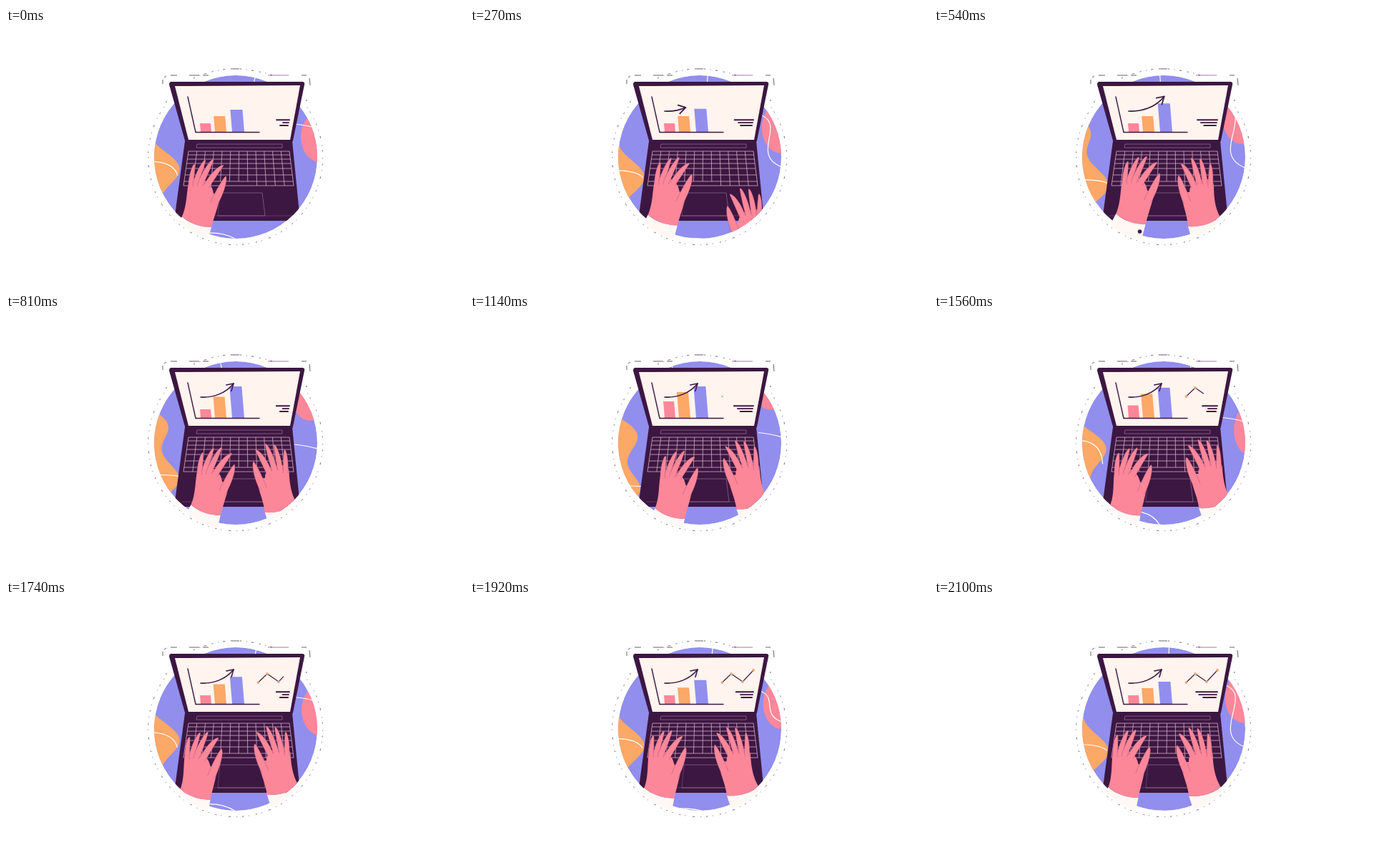
These frames come from a looping animation (640 px wide and 360 px high, 2.13 s). An HTML page:

```html
<!DOCTYPE html>
<html lang="en">
<head>
<meta charset="utf-8">
<title>Typing on a laptop</title>
<style>
html, body { margin: 0; width: 100%; height: 100%; overflow: hidden; background: #fff; }
svg { display: block; width: 100vw; height: 100vh; }
.ink { fill: none; stroke: #3c1742; stroke-linecap: round; stroke-linejoin: round; }
.white { fill: none; stroke: #fff; stroke-width: 1.2; }
.keys { fill: none; stroke: #dcb4c8; stroke-width: .75; }
.skin { fill: #fc8799; }
.finger { fill: #fc8799; stroke: #8c3f68; stroke-width: .35; }
.cloth { fill: #fff8f4; }
.dark { fill: #3c1742; }
.edge { fill: none; stroke: #2b1730; stroke-width: .7; }
</style>
</head>
<body>
<svg viewBox="0 0 640 360">
  <defs>
    <clipPath id="disc"><circle cx="321" cy="180" r="114"/></clipPath>
    <clipPath id="sticker"><circle cx="320" cy="180" r="120"/></clipPath>
  </defs>

  <g class="edge">
    <path stroke-dasharray="2 7 1 9 2 6 1 10 3 8 1 7" d="M224 102L224 106A122 122 0 1 0 418 107L420 100"/>
    <path stroke-dasharray="2 7 1 6 3 8" d="M262 70Q290 58 314 57M327 57Q350 59 372 66"/>
    <path d="M314 57H326M230 66H239M256 66H270M275 66H283M413 66H420M219 78V72M221 69L224 67M424 70L425 80"/>
    <path stroke="#754281" d="M366 66H395"/>
  </g>

  <g clip-path="url(#disc)">
    <circle cx="321" cy="180" r="114" fill="#918eee"/>
    <path id="orange" fill="#fca867"/>
    <ellipse id="pink" fill="#fc8799" ry="35"/>
    <g class="white">
      <path id="lineL"/><path id="lineR"/><path id="lineB"/><path id="lineT"/>
    </g>
    <path class="dark" d="M250 158H400L411 269H235Z"/>
  </g>

  <path class="dark" d="M231 75H414Q418 75 417 79L401 157Q400 161 396 161H254Q251 161 250 157L228 79Q228 75 231 75Z"/>
  <path fill="#fff4ee" d="M236 81L411 80L397 156H255Z"/>
  <g class="keys">
    <path opacity=".55" d="M267 162H386V167H266Z"/>
    <path id="grid"/>
    <path opacity=".5" d="M299 230H358L362 262H296"/>
    <path opacity=".3" d="M246 262H400M296 262L299 230"/>
  </g>

  <g id="bars"></g>
  <path class="ink" stroke-width="1.4" d="M254 96L265 145.500H354"/>
  <g id="arrow" class="ink" stroke-width="1.6">
    <path id="shaft" d="M272 116C289 117 307 111 318 97"/>
    <path id="head" d="M-9 -5L0 0L-9 6"/>
  </g>
  <path id="trend" class="ink" stroke-width="1.1"/>
  <g id="dots" fill="#eaa777"></g>
  <path id="notes" class="ink" stroke-width="1.9"/>

  <g clip-path="url(#sticker)">
    <g class="cloth left">
      <path d="M246 263C256 273 272 278 287 278L276 320H215Z"/>
      <circle id="button" class="dark" cx="279" cy="288" r="2.800"/>
    </g>
    <path class="cloth right" d="M355 277C372 278 389 273 400 264L430 320H367Z"/>
  </g>
  <g clip-path="url(#disc)">
    <g class="left" id="leftHand">
      <path class="skin" d="M246 263C253 247 252 231 255 217C259 208 270 208 280 214C286 218 289 224 290 231L300 234C296 250 291 263 287 278C272 278 256 273 246 263Z"/>
    </g>
    <g class="right" id="rightHand">
      <path class="skin" d="M355 277C354 261 347 246 345 229L357 229C357 219 364 214 372 212C382 209 391 211 391 220C391 237 393 252 400 264C389 273 372 278 355 277Z"/>
    </g>
  </g>
</svg>
<script>
const LOOP = 2130, STEP = 30, DRIFT = 1770;
const NS = 'http://www.w3.org/2000/svg';
const $ = id => document.getElementById(id);
const setD = (id, d) => $(id).setAttribute('d', d);

function add(parent, tag, attrs) {
  const el = document.createElementNS(NS, tag);
  for (const k in attrs) el.setAttribute(k, attrs[k]);
  return parent.appendChild(el);
}

const ramp = (t, a, b) => Math.max(0, Math.min(1, (t - a) / (b - a)));
function ease(t, a, b) {
  const f = ramp(t, a, b);
  return f * f * (3 - 2 * f);
}
// Age of a drifting shape, counted from its own entry time.
const age = (t, from) => ((t - from) % DRIFT + DRIFT) % DRIFT + from;

function finger(hand, bx, by, tx, ty, w, bend) {
  const len = Math.hypot(tx - bx, ty - by);
  const nx = -(ty - by) / len, ny = (tx - bx) / len;
  const p = (f, s) => `${bx + (tx - bx) * f + nx * s} ${by + (ty - by) * f + ny * s}`;
  add(hand, 'path', {
    class: 'finger',
    d: `M${p(0, -w / 2)}C${p(.4, bend - w * .62)} ${p(.85, bend - w * .4)} ${p(1, -1)}` +
       `Q${p(1.06, 0)} ${p(1, 1)}C${p(.85, bend + w * .4)} ${p(.4, bend + w * .62)} ${p(0, w / 2)}`
  });
}

const L = $('leftHand'), R = $('rightHand');
finger(L, 258, 221, 263, 191, 6.500, -1);
finger(L, 264, 219, 278, 185, 7, -1);
finger(L, 271, 219, 289, 184, 7.500, -1);
finger(L, 280, 221, 303, 192, 8, -2);
finger(L, 290, 246, 307, 208, 10, 1);
finger(R, 386, 222, 386, 190, 6.500, 1);
finger(R, 379, 218, 372, 183, 7, 1);
finger(R, 371, 218, 360, 182, 7.500, 1);
finger(R, 363, 221, 346, 190, 8, 2);
finger(R, 354, 244, 342, 207, 10, -1);

const rowYs = [172, 177, 183, 189, 196, 205, 214, 220];
const keyX = (f, y) => {
  const s = (y - 172) / 48;
  return 255 - 7 * s + f * (141 + 13 * s);
};
let grid = '';
rowYs.forEach((y, i) => {
  grid += `M${keyX(0, y)} ${y}H${keyX(1, y)}`;
  const next = rowYs[i + 1];
  if (!next) return;
  for (let c = 0; c <= 12; c++) {
    if (i === 6 && c > 3 && c < 8) continue;
    grid += `M${keyX(c / 12, y)} ${y}L${keyX(c / 12, next)} ${next}`;
  }
});
setD('grid', grid);

const bars = ['#fc8799', '#fca867', '#918eee'].map(fill => add($('bars'), 'path', { fill }));
const trendPts = [[352.500, 115], [365, 103], [381, 114], [396, 98]];
const dots = trendPts.map(([cx, cy]) => add($('dots'), 'circle', { cx, cy }));
const segs = trendPts.slice(1).map((p, i) => Math.hypot(p[0] - trendPts[i][0], p[1] - trendPts[i][1]));
const trendLen = segs.reduce((a, b) => a + b);
const shaft = $('shaft'), shaftLen = shaft.getTotalLength();

// The orange edge is a wave that travels down by one wavelength per drift.
function orangeWave(t) {
  const wave = 83, crest = 112 + wave * t / DRIFT;
  let d = 'M190 120';
  for (let y = 120; y <= 270; y += 3) {
    const mid = 232 - ((y - 212) / 14) ** 2;
    d += `L${mid + 12 * Math.cos(2 * Math.PI * (y - crest) / wave)} ${y}`;
  }
  return d + 'L190 270Z';
}

function background(t) {
  setD('orange', orangeWave(t));

  const p = age(t, -450);
  $('pink').setAttribute('cx', 438 - .016 * p);
  $('pink').setAttribute('cy', 152 - .047 * p);
  $('pink').setAttribute('rx', 18 + 8 * ramp(p, -450, 0));

  const l = p + 450, ly = 165 + .047 * l;
  setD('lineL', `M200 ${ly}Q234 ${ly} ${242 - 21 * Math.exp(-l / 200)} ${ly + 60 * Math.exp(-l / 400)}`);

  const r = age(t, -1070), ry = 134 - .05 * r, k = ramp(r, 0, 330);
  setD('lineR', `M403 ${ry}C${415 + 36 * k} ${ry + 1 + 12 * k} ${425 - 42 * k} ${ry + 3 + 65 * k} 435 ${ry + 6 + 82 * k}`);

  const b = age(t, -600);
  setD('lineB', `M${281 - .041 * b} ${286 + .046 * b}Q${305 - .015 * b} ${285 + .02 * b} ${322 + .03 * b} 295`);

  const x = 349 - .062 * p;
  setD('lineT', `M${x} 65L${x + (325 - x) * .12} 77`);
}

function chart(t) {
  const swell = (up, full, hold, down) => ease(t, up, full) - ease(t, hold, down);
  const heights = [
    12 + 11 * swell(840, 1110, 1410, 1710),
    22 + 14 * swell(540, 1050, 1400, 2000),
    31 + 13 * swell(150, 780, 1400, 2100)
  ];
  heights.forEach((h, i) => {
    const x = 272 + 22 * i - (i === 1 ? 2 : 0), w = 15 + i;
    bars[i].setAttribute('d', `M${x - h / 12} ${145 - h}h${w}L${x + w} 145H${x}Z`);
  });

  const s = Math.sin(Math.PI * t / 850) ** 2;
  setD('notes', `M${378 - 12 * s} 128.300H396M${387 - 17 * s} 132.100H395M${383 - 7 * s} 136H394`);
}

function arrow(t) {
  const p = ramp(t, 60, 450), s = 1 + .08 * (1 - ease(t, 540, 720));
  $('arrow').style.display = p > 0 ? '' : 'none';
  $('arrow').setAttribute('transform', `translate(272 116) scale(${s}) translate(-272 -116)`);
  shaft.setAttribute('stroke-dasharray', `${p * shaftLen} 99`);
  const tip = shaft.getPointAtLength(p * shaftLen);
  const back = shaft.getPointAtLength(Math.max(0, p * shaftLen - 3));
  const turn = Math.atan2(tip.y - back.y, tip.x - back.x) * 180 / Math.PI;
  $('head').setAttribute('transform', `translate(${tip.x} ${tip.y}) rotate(${turn + 10})`);
}

function trend(t) {
  let left = ramp(t, 1180, 1890) * trendLen;
  let d = left > 0 ? `M${trendPts[0]}` : '';
  dots[0].setAttribute('r', 1.900 * ramp(t, 1080, 1170));
  segs.forEach((len, i) => {
    const f = ramp(left, 0, len);
    const [x, y] = trendPts[i], [u, v] = trendPts[i + 1];
    if (f > 0) d += `L${x + (u - x) * f} ${y + (v - y) * f}`;
    dots[i + 1].setAttribute('r', f > .995 ? 1.900 : 0);
    left -= len;
  });
  setD('trend', d);
}

// Shifts the fingers by x, y and leans the hand so that the wrist moves by its own x.
function pose(side, x, y, wrist) {
  const lean = (wrist - x) / 80;
  for (const el of document.querySelectorAll('.' + side))
    el.setAttribute('transform', `matrix(1 0 ${lean} 1 ${x - lean * 190} ${y})`);
}

function hands(t) {
  pose('left',
    12 * ease(t, 0, 900) - 19 * ease(t, 1000, 1700),
    -4 * ease(t, 0, 450) + 12 * ease(t, 570, 1000) - 10 * ease(t, 1100, 2100),
    13 * ease(t, 0, 900) - 15 * ease(t, 1100, 1740));
  const away = 1 - ease(t, 60, 400);
  pose('right',
    55 * away + 12 * ease(t, 600, 1200) - 15 * ease(t, 1400, 2100),
    130 * away - 6 * ease(t, 800, 1300) + 3 * ease(t, 1500, 2130),
    55 * away + 17 * ease(t, 600, 1100) - 16 * ease(t, 1400, 2100));
  $('button').style.display = t >= 450 && t < 630 ? '' : 'none';
}

function draw(t) {
  background(t);
  chart(t);
  arrow(t);
  trend(t);
  hands(t);
}

const start = performance.now();
function tick() {
  const t = (performance.now() - start) % LOOP;
  draw(Math.floor(t / STEP) * STEP);
  requestAnimationFrame(tick);
}
tick();
</script>
</body>
</html>
```
